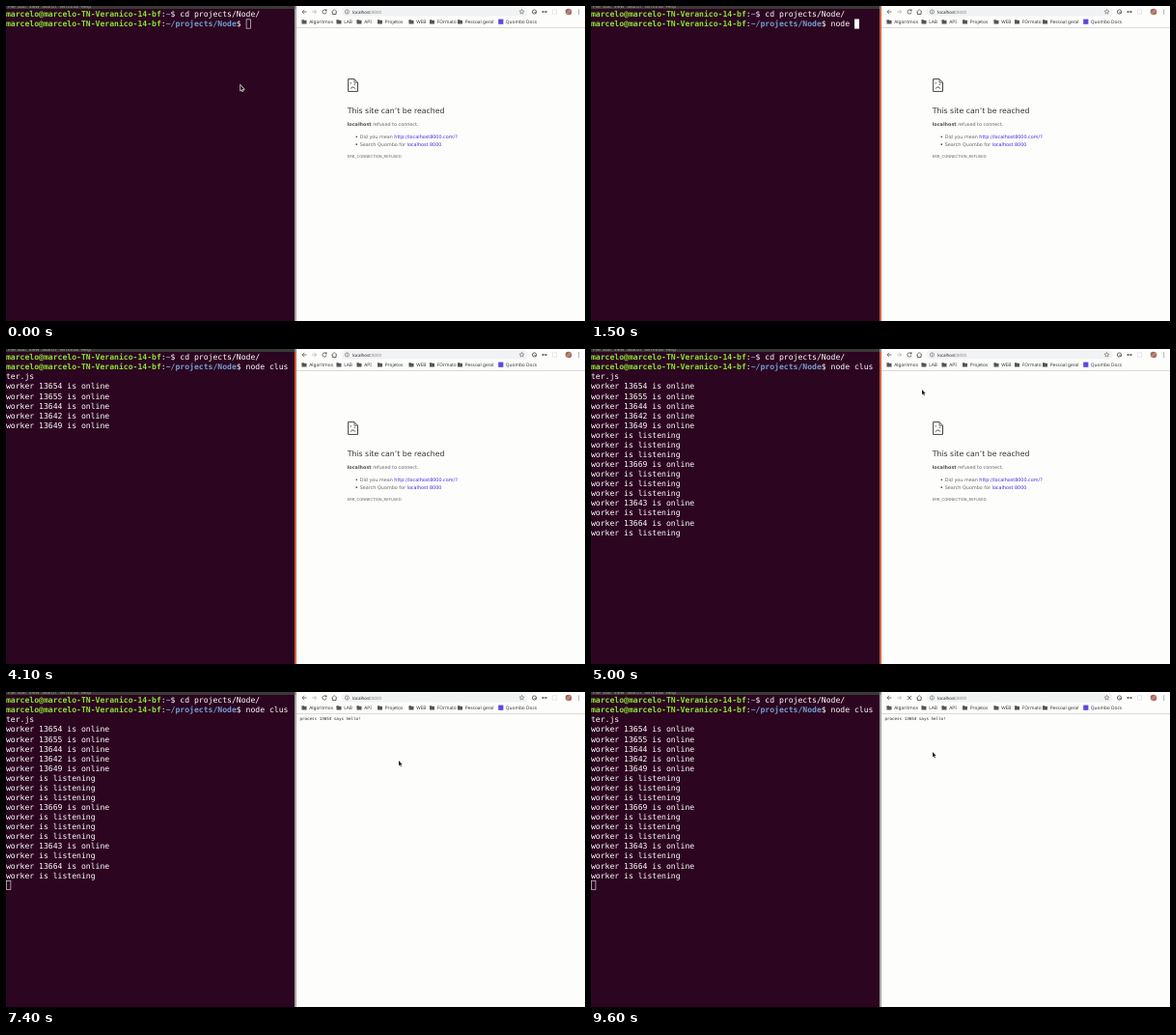
These frames come from a looping animation (600x326 px, 10 s). An HTML page with a canvas:

```html
<!DOCTYPE html>
<html lang="en">
<head>
<meta charset="utf-8">
<title>Terminal and browser</title>
<style>
html, body { margin: 0; width: 100%; height: 100%; overflow: hidden; background: #fdfdfd; }
canvas { display: block; width: 600px; height: 326px; }
</style>
</head>
<body>
<canvas id="stage"></canvas>
<script>
const W = 600, H = 326, LOOP = 10000;
const canvas = document.getElementById('stage');
const ctx = canvas.getContext('2d');
const ratio = window.devicePixelRatio || 1;
canvas.width = W * ratio;
canvas.height = H * ratio;

const MONO = '"DejaVu Sans Mono", monospace';
const SANS = '"DejaVu Sans", sans-serif';
const UI = '"Noto Sans", sans-serif';
const TERM_SIZE = 8.1, CELL = 4.876, ROW = 10.08;

const FOCUS_TERM = 500, ENTER = 4000, FOCUS_URL = 5400, LOADED = 7400, RELOAD = 9600;

const typed = [[0, ''], [1200, 'n'], [1300, 'no'], [1400, 'node'], [1500, 'node '],
  [2200, 'node cl'], [2400, 'node clus'], [2500, 'node cluster.js ']];
const printed = [[0, 0], [4100, 5], [4200, 14], [4500, 16]];
const cursorOff = [[1000, 1200], [2000, 2200], [3000, 3500], [4000, 4500], [5000, 5400]];
const workers = [13654, 13655, 13644, 13642, 13649, 0, 0, 0, 13669, 0, 0, 0, 13643, 0, 13664, 0];

// time, x, y of the pointer tip
const path = [[4700, 243, 82], [4800, 262, 75], [4900, 303, 58], [5000, 343, 42], [5300, 391, 6],
  [5900, 391, 6], [6000, 395, 19], [6100, 396, 28], [6300, 399, 50], [6600, 401, 70],
  [6700, 401, 70], [6900, 407, 71], [8300, 407, 71], [8400, 410.5, 70], [8800, 354, 62]];

const folders = [[309, 'Algoritmos'], [345, 'LAB'], [366, 'API'], [387.5, 'Projetos'],
  [420, 'WEB'], [441.5, 'FOrmato'], [470.5, 'Pessoal geral']];

function latest(steps, t) {
  let value = steps[0][1];
  for (const [at, v] of steps) if (t >= at) value = v;
  return value;
}

function text(s, x, y, size, family, color, weight = 'normal') {
  ctx.font = `${weight} ${size}px ${family}`;
  ctx.fillStyle = color;
  ctx.fillText(s, x, y);
  return x + ctx.measureText(s).width;
}

function rect(x, y, w, h, color) {
  ctx.fillStyle = color;
  ctx.fillRect(x, y, w, h);
}

function disc(x, y, r, color) {
  ctx.fillStyle = color;
  ctx.beginPath();
  ctx.arc(x, y, r, 0, Math.PI * 2);
  ctx.fill();
}

function line(points, color, width = 0.8, close = false) {
  ctx.strokeStyle = color;
  ctx.lineWidth = width;
  ctx.beginPath();
  points.forEach(([x, y]) => ctx.lineTo(x, y));
  if (close) ctx.closePath();
  ctx.stroke();
}

function ring(x, y, r, color, width, from = 0, to = Math.PI * 2) {
  ctx.strokeStyle = color;
  ctx.lineWidth = width;
  ctx.beginPath();
  ctx.arc(x, y, r, from, to);
  ctx.stroke();
}

function termText(s, row, x = 0, color = '#fff', weight) {
  return text(s, x, 11.2 + row * ROW, TERM_SIZE, MONO, color, weight);
}

function prompt(row, dir) {
  let x = termText('marcelo@marcelo-TN-Veranico-14-bf', row, 0, '#8ae234', 'bold');
  x = termText(':', row, x);
  x = termText(dir, row, x, '#729fcf', 'bold');
  return termText('$ ', row, x);
}

function drawTerminal(t) {
  const focused = t >= FOCUS_TERM && t < FOCUS_URL;
  rect(0, 0, 300, H, '#2c0520');
  rect(0, 0, 300, 3, '#3a3935');
  text('File  Edit  View  Search  Terminal  Help', 2, 1.5, 4.9, UI, '#aaa69d');
  rect(299, 3, 2, H - 3, focused ? '#d4623c' : '#aba5a3');
  rect(299, 0, 2, 3, '#8c8886');

  termText('cd projects/Node/', 0, prompt(0, '~'));
  const command = latest(typed, t);
  const x = prompt(1, '~/projects/Node');
  termText(command.slice(0, 9), 1, x);
  termText(command.slice(9), 2);

  const count = latest(printed, t);
  workers.slice(0, count).forEach((id, i) =>
    termText(id ? `worker ${id} is online` : 'worker is listening', 3 + i));

  let col = 51 + command.length, row = 1;
  if (command.length > 9) { col = command.length - 9; row = 2; }
  if (t >= ENTER) { col = 0; row = 3 + count; }
  const top = 3.4 + row * ROW;
  if (!focused) {
    ctx.strokeStyle = '#d8d2d6';
    ctx.lineWidth = 0.7;
    ctx.strokeRect(col * CELL + 0.4, top + 0.4, CELL - 0.4, ROW - 0.8);
  } else if (!cursorOff.some(([a, b]) => t >= a && t < b)) {
    rect(col * CELL, top, CELL, ROW, '#fff');
  }
}

function folder(x, y) {
  rect(x - 2.5, y - 2, 2.4, 1.5, '#555');
  rect(x - 2.5, y - 1.5, 5, 3.7, '#555');
}

function drawNavigation(loading) {
  const ink = '#555', faint = '#b4b4b4';
  line([[311.5, 6], [307, 6]], ink);
  line([[309, 3.8], [306.9, 6], [309, 8.2]], ink);
  line([[317, 6], [321.5, 6]], faint);
  line([[319.5, 3.8], [321.6, 6], [319.5, 8.2]], faint);
  if (loading) {
    line([[328, 4], [332, 8]], ink);
    line([[332, 4], [328, 8]], ink);
  } else {
    ring(330, 6, 2.1, ink, 0.8, 0.2, Math.PI * 1.72);
    rect(330.8, 3.5, 1.7, 1.8, ink);
  }
  line([[337.4, 6.2], [340.2, 3.6], [343, 6.2]], ink);
  line([[338.3, 5.8], [338.3, 8.5], [342.1, 8.5], [342.1, 5.8]], ink, 0.9);
}

function drawStar(x, y, r) {
  const points = Array.from({ length: 10 }, (_, i) => {
    const a = -Math.PI / 2 + i * Math.PI / 5, d = i % 2 ? r * 0.45 : r;
    return [x + d * Math.cos(a), y + d * Math.sin(a)];
  });
  line(points, '#666', 0.6, true);
}

function drawAddress(active) {
  ctx.beginPath();
  ctx.roundRect(347.5, 1.3, 193, 9.2, 4.6);
  ctx.fillStyle = active ? '#fff' : '#f1f2f3';
  ctx.fill();
  if (active) {
    ctx.strokeStyle = '#5a94e8';
    ctx.lineWidth = 0.8;
    ctx.stroke();
    rect(358.6, 2.8, 30.6, 6.4, '#aecbf0');
    ctx.strokeStyle = '#777';
    ctx.lineWidth = 0.6;
    ctx.strokeRect(521.7, 4.4, 4.8, 3.3);
    rect(522.4, 6.2, 3.4, 0.6, '#777');
  }
  ring(353.4, 6, 2.1, '#666', 0.6);
  rect(353.1, 5.6, 0.6, 1.6, '#666');
  rect(353.1, 4.6, 0.6, 0.6, '#666');
  const x = text('localhost', 359, 7.6, 4.45, UI, '#222');
  text(':8000', x, 7.6, 4.45, UI, active ? '#222' : '#888');
  drawStar(534.5, 6, 2.6);
}

function drawExtensions() {
  ring(547.5, 6, 2.1, '#444', 0.8);
  line([[547.5, 6], [549.3, 7.8]], '#444', 0.9);
  disc(556.4, 6, 1.1, '#666');
  disc(559.6, 6, 1.1, '#666');
  rect(556, 5.7, 4, 0.6, '#666');
  ctx.strokeStyle = '#ddd';
  ctx.lineWidth = 0.6;
  ctx.strokeRect(566.3, 3.8, 4.4, 4.4);
  const tone = ctx.createLinearGradient(580, 3, 586, 9);
  tone.addColorStop(0, '#6e4b42');
  tone.addColorStop(0.5, '#c08a78');
  tone.addColorStop(1, '#8d4a48');
  disc(583, 6, 3.3, tone);
  for (const y of [4, 6, 8]) disc(593.7, y, 0.55, '#555');
}

function drawErrorPage() {
  line([[354.6, 75.6], [361, 75.6], [364.5, 79.2], [364.5, 88.4], [354.6, 88.4]], '#444', 1, true);
  line([[361, 75.6], [361, 79.2], [364.5, 79.2]], '#444', 0.8);
  rect(356.8, 79.3, 1.1, 1.1, '#444');
  rect(360.7, 80.7, 1.1, 1.1, '#444');
  ring(359.5, 86.2, 2.3, '#444', 0.9, Math.PI * 1.08, Math.PI * 1.92);

  const size = 4.88, grey = '#666', link = '#4029dc';
  text('This site can’t be reached', 353.7, 111.1, 7.8, SANS, '#333');
  let x = text('localhost', 353.7, 124.3, size, SANS, '#555', 'bold');
  text(' refused to connect.', x, 124.3, size, SANS, grey);
  disc(363.3, 135.3, 0.85, '#555');
  disc(363.3, 143.2, 0.85, '#555');
  x = text('Did you mean ', 366.7, 136.9, size, SANS, grey);
  text('http://localhost8000.com/?', x, 136.9, size, SANS, link);
  x = text('Search Quombo for ', 366.7, 144.8, size, SANS, grey);
  text('localhost 8000', x, 144.8, size, SANS, link);
  text('ERR_CONNECTION_REFUSED', 353.7, 157, 3.88, SANS, grey);
}

function drawBrowser(t) {
  rect(301, 0, W - 301, H, '#fdfdfc');
  drawNavigation(t >= RELOAD);
  drawAddress(t >= FOCUS_URL && t < LOADED);
  drawExtensions();
  for (const [x, name] of folders) {
    folder(x, 16.3);
    text(name, x + 5.2, 18.1, 4.8, UI, '#333');
  }
  rect(510.2, 13.6, 5.2, 5.2, '#5a48e0');
  text('Quombo Docs', 517.8, 18.1, 4.8, UI, '#333');
  rect(301, 22, W - 301, 0.8, '#d2d2d2');
  if (t < LOADED) drawErrorPage();
  else text('process 13654 says hello!', 304.4, 29.4, 4.22, MONO, '#222');
}

function pointerAt(t) {
  const i = path.findIndex(p => p[0] > t);
  if (i === 0) return path[0].slice(1);
  if (i < 0) return path[path.length - 1].slice(1);
  const [t0, x0, y0] = path[i - 1], [t1, x1, y1] = path[i];
  const k = (t - t0) / (t1 - t0);
  return [x0 + (x1 - x0) * k, y0 + (y1 - y0) * k];
}

function drawPointer(t) {
  if (t >= 1200 && t < 4800) return;
  const [x, y] = pointerAt(t);
  if (x > 347 && y < 11) {
    line([[x, y - 3], [x, y + 3]], '#333', 0.6);
    line([[x - 1, y - 3], [x + 1, y - 3]], '#333', 0.6);
    line([[x - 1, y + 3], [x + 1, y + 3]], '#333', 0.6);
    return;
  }
  const shape = [[0, 0], [0, 5.3], [1.2, 4.3], [2, 6.2], [2.9, 5.8], [2.1, 4], [3.7, 3.9]];
  line(shape.map(([a, b]) => [x + a, y + b]), '#fff', 1.1, true);
  ctx.fillStyle = '#222';
  ctx.fill();
}

function frame(now) {
  const t = Math.floor((now % LOOP) / 100) * 100;
  ctx.setTransform(ratio, 0, 0, ratio, 0, 0);
  ctx.textRendering = 'geometricPrecision';
  drawTerminal(t);
  drawBrowser(t);
  drawPointer(t);
  requestAnimationFrame(frame);
}

const start = performance.now();
frame(0);
function tick() {
  return Math.max(0, performance.now() - start);
}
</script>
</body>
</html>
```
